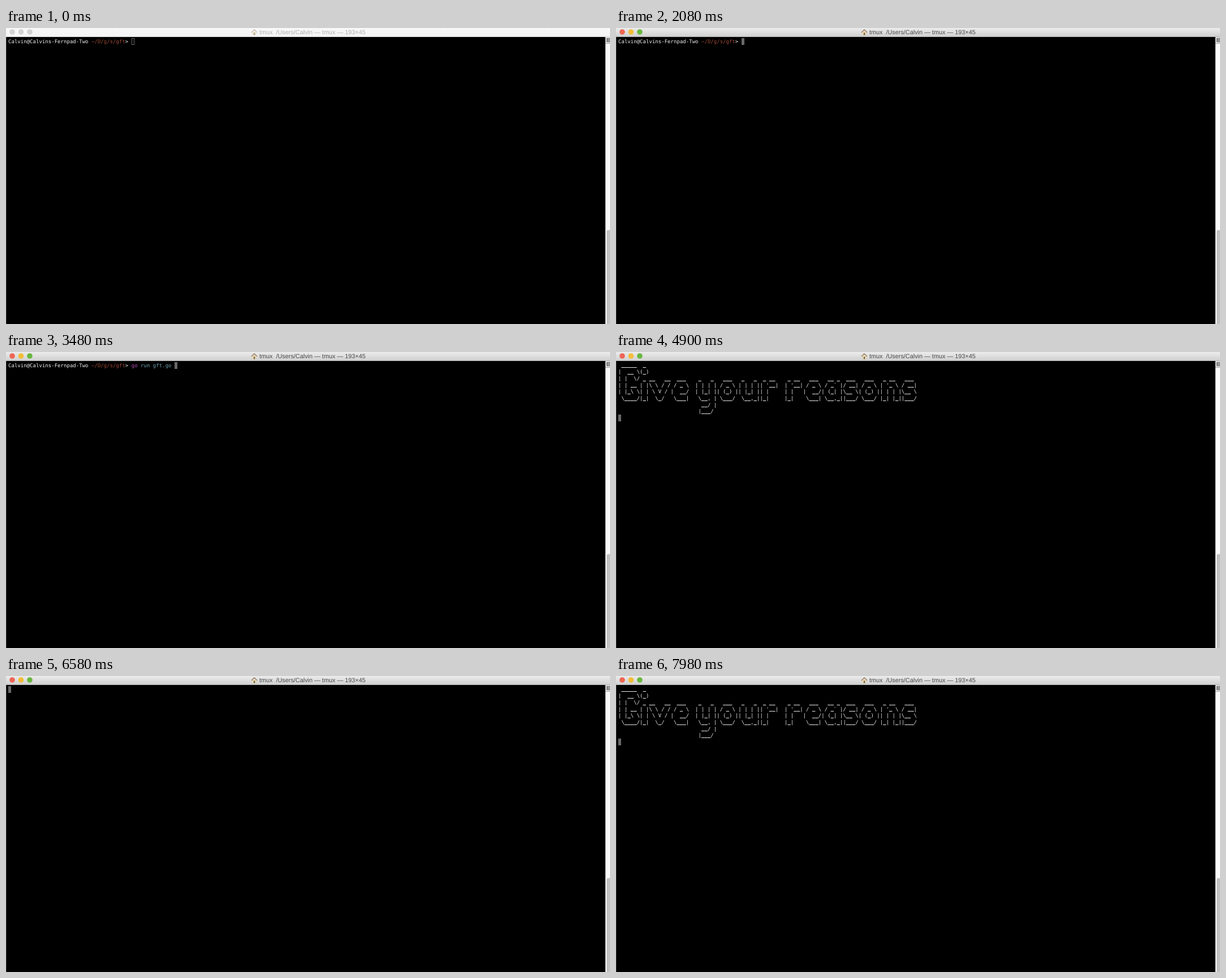
Animation, 1068 px wide and 525 px high, one loop 8 s. Source, as an HTML page with a canvas:

```html
<!DOCTYPE html>
<html lang="en">
<head>
<meta charset="utf-8">
<title>Terminal banner</title>
<style>
html, body { margin: 0; height: 100%; overflow: hidden; background: #000; }
canvas { display: block; }
</style>
</head>
<body>
<canvas id="stage" width="1068" height="525"></canvas>
<pre id="banner" hidden>
 _____  _
|  __ \(_)
| |  \/ _ __   __  ___    _   _   ___   _   _  _ __    _ __   ___   __ _  ___   ___   _ __   ___
| | __ | |\ \ / / / _ \  | | | | / _ \ | | | || '__|  | '__| / _ \ / _` |/ __| / _ \ | '_ \ / __|
| |_\ \| | \ V / |  __/  | |_| || (_) || |_| || |     | |   |  __/| (_| |\__ \| (_) || | | |\__ \
 \____/|_|  \_/   \___|   \__, | \___/  \__,_||_|     |_|    \___| \__,_||___/ \___/ |_| |_||___/
                           __/ |
                          |___/</pre>
<script>
const ctx = document.getElementById('stage').getContext('2d');
const banner = document.getElementById('banner').textContent.replace(/^\n/, '').split('\n');

const LOOP = 8000;
const ACTIVATE = 1200, TYPE = 2300, KEY = 75, ENTER = 3700;
const SHOW = 4500, CLEAR = 6150, SHOW_AGAIN = 7750;
const CELL_W = 5.444, CELL_H = 11.65, LEFT = 4, TOP = 18;

const prompt = [
  ['Calvin@Calvins-Fernpad-Two ', '#f0f0f0'],
  ['~/D/g/s/gft', '#a04a36'],
  ['> ', '#f0f0f0']
];
const command = [['go ', '#b552b5'], ['run gft.go ', '#6fa3b3']];

function rect(x, y, w, h, color) {
  ctx.fillStyle = color;
  ctx.fillRect(x, y, w, h);
}

function shape(points, color) {
  ctx.fillStyle = color;
  ctx.beginPath();
  points.forEach(([x, y]) => ctx.lineTo(x, y));
  ctx.fill();
}

// Places each character on the terminal grid.
function put(text, col, row, color) {
  ctx.font = '9.04px "DejaVu Sans Mono", monospace';
  ctx.fillStyle = color;
  const base = TOP + 8.8 + row * CELL_H;
  [...text].forEach((ch, i) => {
    const x = LEFT + (col + i) * CELL_W;
    if (ch === '_') ctx.fillRect(x, Math.round(base + 0.6), CELL_W, 1);
    else if (ch !== ' ') ctx.fillText(ch, x, base);
  });
}

function putRuns(runs, col, limit = Infinity) {
  for (const [text, color] of runs) {
    const part = text.slice(0, Math.max(0, limit));
    put(part, col, 0, color);
    col += part.length;
    limit -= text.length;
  }
  return col;
}

function cursor(col, row, active) {
  const x = Math.round(LEFT + col * CELL_W), y = Math.round(TOP + row * CELL_H);
  if (active) return rect(x, y, 5, 12, '#686868');
  ctx.strokeStyle = '#6a6a6a';
  ctx.lineWidth = 1;
  ctx.strokeRect(x + 0.5, y + 0.5, 4, 11);
}

function titleBar(active) {
  const fade = ctx.createLinearGradient(0, 0, 0, 15);
  fade.addColorStop(0, active ? '#ececec' : '#f8f8f8');
  fade.addColorStop(1, active ? '#d0d0d0' : '#f4f4f4');
  rect(0, 0, 1068, 15, fade);
  rect(0, 15, 1068, 1, active ? '#b0b0b0' : '#d8d8d8');

  const lights = active ? ['#ee6655', '#f4bd38', '#68b83f'] : Array(3).fill('#d2d2d2');
  lights.forEach((color, i) => {
    ctx.fillStyle = color;
    ctx.beginPath();
    ctx.arc(11 + i * 15.5, 7, 4.8, 0, 7);
    ctx.fill();
  });

  ctx.globalAlpha = active ? 1 : 0.5;
  rect(435.5, 7, 7, 5.5, '#e3d5ac');
  rect(438, 8.5, 2.2, 4, '#735f42');
  shape([[433.5, 7.5], [439, 2], [444.5, 7.5], [443.5, 8.2], [439, 4], [434.5, 8.2]], '#98714f');
  ctx.globalAlpha = 1;

  ctx.font = '10.85px "Liberation Sans", Arial, sans-serif';
  ctx.fillStyle = active ? '#484848' : '#b2b2b2';
  ctx.fillText('tmux \u00a0/Users/Calvin — tmux — 193×45', 448, 11);
}

function scrollBar() {
  rect(1059, 16, 1, 509, '#2c2c26');
  rect(1060, 16, 8, 509, '#fafafa');
  rect(1060, 16, 8, 11, '#e2e2e2');
  rect(1060, 27, 8, 1, '#a8a8a8');
  rect(1062, 18, 6, 7, '#555');
  for (let y = 19; y < 25; y += 2) rect(1063, y, 5, 1, '#d8d8d8');
  ctx.fillStyle = '#c1c1c1';
  ctx.beginPath();
  ctx.roundRect(1062, 358.5, 8, 180, 3);
  ctx.fill();
}

function terminal(t) {
  if (t < SHOW) {
    const typed = Math.max(0, Math.floor((t - TYPE) / KEY) + 1);
    const col = putRuns(command, putRuns(prompt, 0), typed);
    if (t < ENTER) cursor(col, 0, t >= ACTIVATE);
    else cursor(0, 1, true);
  } else if (t < CLEAR || t >= SHOW_AGAIN) {
    banner.forEach((line, row) => put(line, 0, row, '#f0f0f0'));
    cursor(0, banner.length, true);
  } else {
    cursor(0, 0, true);
  }
}

function draw(now) {
  const t = now % LOOP;
  ctx.textRendering = 'geometricPrecision';
  rect(0, 0, 1068, 525, '#000');
  rect(0, 16, 1, 509, '#34342c');
  terminal(t);
  titleBar(t >= ACTIVATE);
  scrollBar();
}

const start = performance.now();
function tick() {
  draw(performance.now() - start);
  requestAnimationFrame(tick);
}
tick();
</script>
</body>
</html>
```
